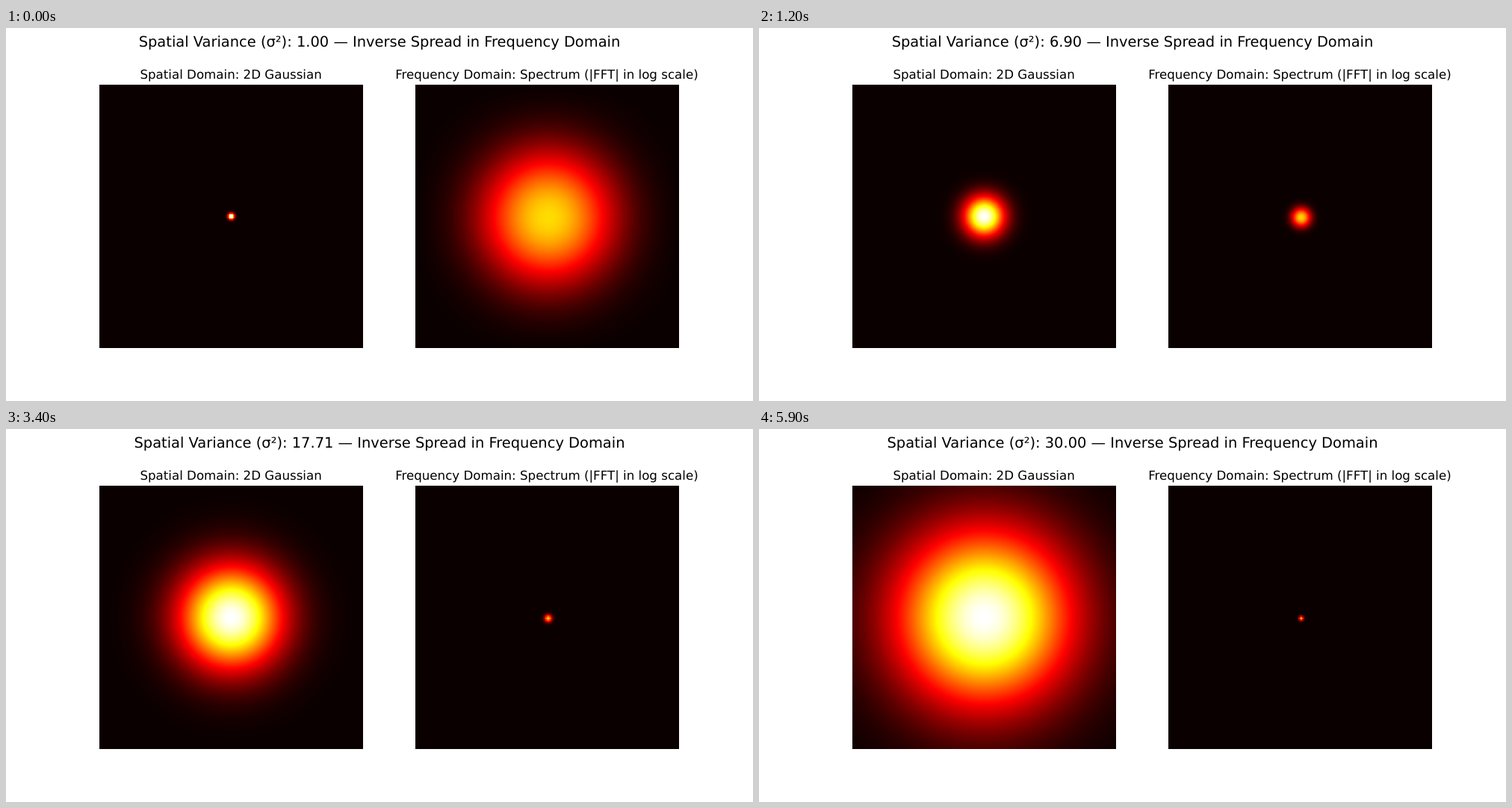
Recreate the animation shown at these times as an HTML page with a canvas. Size 1000 by 500 pixels, loop 6 s.

```html
<!DOCTYPE html>
<html lang="en">
<head>
<meta charset="utf-8">
<title>Gaussian and its spectrum</title>
<style>
  html, body { margin: 0; width: 100%; height: 100%; overflow: hidden; background: #fff; }
  canvas { position: absolute; top: 76px; }
  #spatial { left: 125px; }
  #spectrum { left: 548px; }
  svg { position: absolute; left: 0; top: 0; }
  text { font: 16.667px "DejaVu Sans", sans-serif; text-anchor: middle; text-rendering: geometricPrecision; }
  #heading { font-size: 19.444px; }
</style>
</head>
<body>
<canvas id="spatial" width="353" height="353"></canvas>
<canvas id="spectrum" width="353" height="353"></canvas>
<svg width="1000" height="500">
  <text id="heading" x="500" y="25"></text>
  <text x="301.1" y="68">Spatial Domain: 2D Gaussian</text>
  <text x="723.9" y="68">Frequency Domain: Spectrum (|FFT| in log scale)</text>
</svg>
<script>
const N = 128, SIZE = 353, STEPS = 60, STEP_MS = 100;
const heading = document.getElementById('heading');
const range = (n, fn) => Array.from({ length: n }, (_, i) => fn(i));
const clamp = (v, lo, hi) => Math.min(hi, Math.max(lo, v));

// "Hot" colour map: black to red to yellow to white, packed as ABGR
const RED = 0.365079, YELLOW = 0.746032;
const hot = Uint32Array.from(range(256, i => {
  const x = i / 255;
  const byte = v => Math.round(255 * clamp(v, 0, 1));
  const r = byte(0.0416 + 0.9584 * x / RED);
  const g = byte((x - RED) / (YELLOW - RED));
  const b = byte((x - YELLOW) / (1 - YELLOW));
  return (255 << 24 | b << 16 | g << 8 | r) >>> 0;
}));

// Neighbouring samples and Hann weight for each screen pixel
const taps = range(SIZE, p => {
  const u = (p + 0.5) * N / SIZE - 0.5, i = Math.floor(u);
  return {
    a: clamp(i, 0, N - 1),
    b: clamp(i + 1, 0, N - 1),
    w: 0.5 - 0.5 * Math.cos(Math.PI * (u - i))
  };
});

function panel(id) {
  const ctx = document.getElementById(id).getContext('2d');
  const image = ctx.createImageData(SIZE, SIZE);
  const pixels = new Uint32Array(image.data.buffer);

  // Both fields are a function of the product of one profile in x and y
  return (profile, tone) => {
    const rows = range(N, y => {
      const line = profile.map(v => tone(v * profile[y]));
      return taps.map(t => line[t.a] + (line[t.b] - line[t.a]) * t.w);
    });
    let k = 0;
    for (const t of taps) {
      const top = rows[t.a], bottom = rows[t.b];
      for (let x = 0; x < SIZE; x++) {
        const v = top[x] + (bottom[x] - top[x]) * t.w;
        pixels[k++] = hot[clamp(Math.floor(v * 256), 0, 255)];
      }
    }
    ctx.putImageData(image, 0, 0);
  };
}

const drawSpatial = panel('spatial'), drawSpectrum = panel('spectrum');
const axis = range(N, i => -N / 2 + i * N / (N - 1));

function normalise(list) {
  const max = Math.max(...list);
  return list.map(v => v / max);
}

// Magnitude of the shifted Fourier transform of a symmetric profile
const transform = g => range(N, k => Math.abs(g.reduce((sum, v, j) =>
  sum + v * Math.cos(2 * Math.PI * (k - N / 2) * (j - (N - 1) / 2) / N), 0)));

function draw(step) {
  const spread = 1 + 29 * step / (STEPS - 1);
  const bell = normalise(axis.map(x => Math.exp(-x * x / (2 * spread * spread))));
  heading.textContent =
    `Spatial Variance (σ²): ${spread.toFixed(2)} — Inverse Spread in Frequency Domain`;
  drawSpatial(bell, v => v);
  drawSpectrum(normalise(transform(bell)), Math.log1p);
}

let shown = -1;
function tick() {
  const step = Math.floor(performance.now() / STEP_MS) % STEPS;
  if (step !== shown) draw(shown = step);
  requestAnimationFrame(tick);
}
tick();
</script>
</body>
</html>
```
